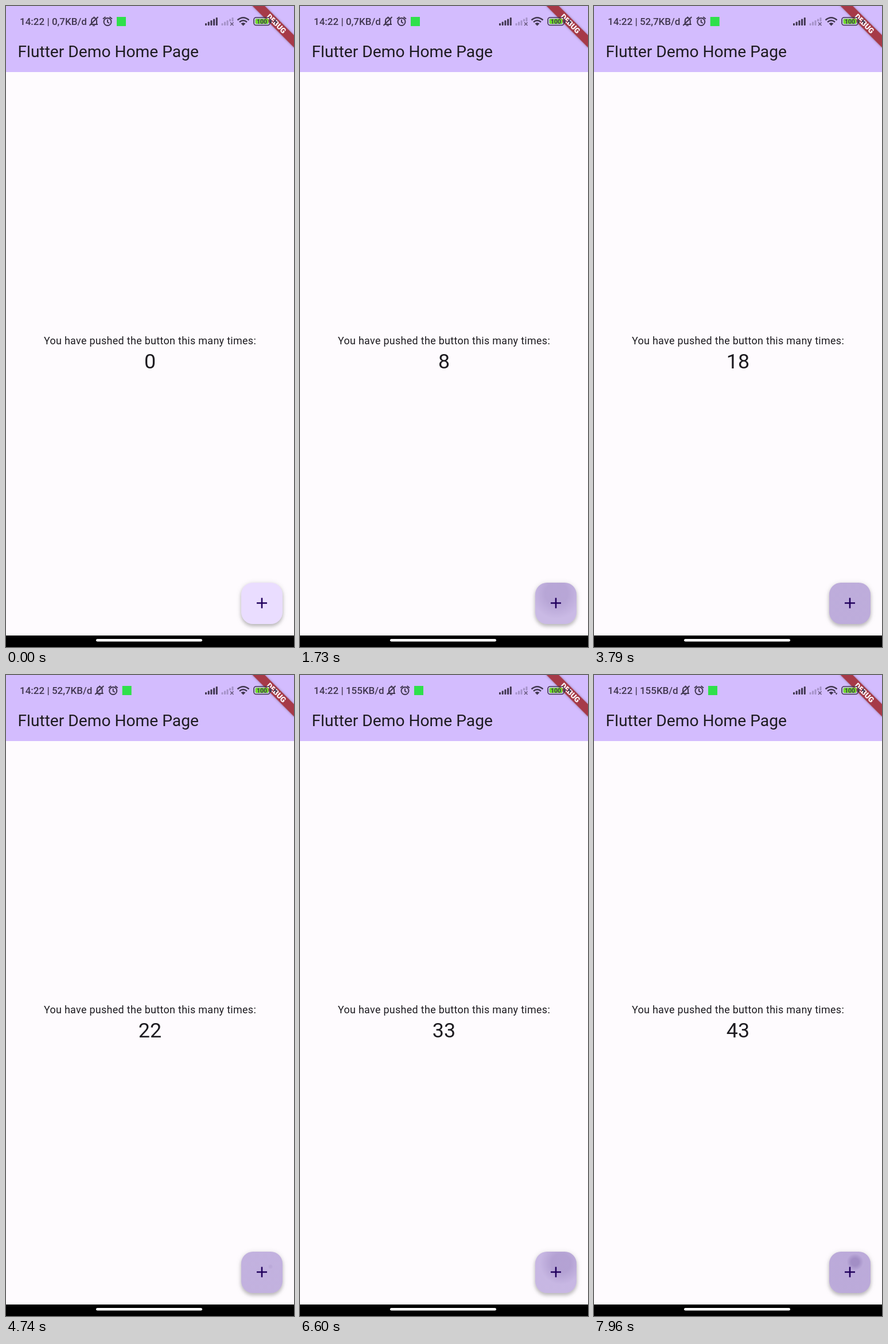
An HTML page for the animation above (8000 ms loop, 502 by 1116 pixels).

```html
<!DOCTYPE html>
<html lang="en">
<head>
<meta charset="utf-8">
<title>Counter demo</title>
<style>
  html, body { margin: 0; width: 100%; height: 100%; overflow: hidden; background: #fefbfe; }
  svg { display: block; width: 502px; height: 1116px; font-family: Roboto, sans-serif; fill: #1d1b20; }
  .line { fill: none; stroke: #40364f; stroke-width: 2; }
  .dark { fill: #40364f; }
  .ribbon { filter: drop-shadow(0 0 2px #0004); }
  .fab { filter: drop-shadow(0 4px 3px #0003) drop-shadow(0 1px 4px #0002); }
</style>
</head>
<body>
<svg viewBox="0 0 502 1116">
  <defs>
    <clipPath id="fabShape"><rect x="410" y="1004" width="72" height="72" rx="20.5"/></clipPath>
    <radialGradient id="ink">
      <stop offset=".45" stop-color="#21005d"/>
      <stop offset="1" stop-color="#21005d" stop-opacity="0"/>
    </radialGradient>
  </defs>
  <rect width="502" height="1116" fill="#fefbfe"/>
  <rect width="502" height="115" fill="#d3bcfe"/>
  <text x="20.5" y="88.5" font-size="28.16">Flutter Demo Home Page</text>

  <g transform="translate(502) rotate(45)">
    <rect class="ribbon" x="-52" y="35.84" width="104" height="15.36" fill="#a63a48"/>
    <text y="48" text-anchor="middle" font-size="13.06" font-weight="900" fill="#fff">DEBUG</text>
  </g>

  <!-- status bar -->
  <text id="status" class="dark" x="24" y="33" font-size="17" font-weight="500"></text>
  <g id="icons">
    <path class="line" d="M147 32h13M149 32v-6q0-5 4.5-5.5q4.5 .5 4.5 5.5v6M145.5 34l15-15"/>
    <path class="dark" d="M151 33.5h4v1.5h-4zM152.5 18.5h2v3h-2z"/>
    <circle class="line" cx="177" cy="27.5" r="6.5"/>
    <path class="line" d="M177 23.5v4.5l3 2M169 22.5l4.5-3.5M185 22.5l-4.5-3.5"/>
    <rect x="193" y="19" width="16" height="16" fill="#2fe04b"/>
  </g>
  <g id="bars" class="dark"></g>
  <path class="line" d="M391 28.5l5.5 5.5M396.500 28.5l-5.5 5.5" style="stroke-width:1.5" opacity=".75"/>
  <path class="line" style="stroke-width:2.4" d="M403.5 24.5q10-8.5 20 0M407 28q6.5-5.5 13 0"/>
  <path class="dark" d="M409.5 30.5q4-3 8 0l-4 4z"/>
  <path id="traffic" class="dark" d="M418 31l2-3 2 3zM420.5 31.5h4l-2 3z"/>
  <rect class="line" x="432" y="20" width="28" height="13.5" rx="4" style="stroke-width:1.6"/>
  <rect x="434.5" y="22.3" width="23" height="9" rx="2" fill="#70dc2c"/>
  <rect class="dark" x="461" y="24" width="2" height="5.5"/>
  <path class="dark" d="M471 21l-5 7h3.500l-1 5.500 5-7h-3.500z"/>
  <text class="dark" x="446" y="30.8" font-size="10.5" font-weight="700" text-anchor="middle">100</text>

  <!-- counter -->
  <text x="251" y="588.5" font-size="17.92" letter-spacing=".32" text-anchor="middle">You have pushed the button this many times:</text>
  <text id="count" x="251" y="630.5" font-size="35.84" text-anchor="middle"></text>

  <!-- action button -->
  <rect class="fab" x="410" y="1004" width="72" height="72" rx="20.5" fill="#eaddff"/>
  <g clip-path="url(#fabShape)">
    <rect id="press" x="410" y="1004" width="72" height="72" fill="#21005d"/>
    <g id="splashes" fill="url(#ink)"></g>
  </g>
  <path d="M437 1039.5h18M446 1030.5v18" stroke="#21005d" stroke-width="2.6"/>

  <rect y="1096" width="502" height="20" fill="#000"/>
  <rect x="157" y="1102" width="185" height="4.5" rx="2.25" fill="#fff"/>
</svg>
<script>
const LOOP = 8000, UP_DELAY = 90, POOL = 5;
const $ = id => document.getElementById(id);
const clamp = v => Math.max(0, Math.min(1, v));

function add(parent, tag, attrs = {}) {
  const el = document.createElementNS("http://www.w3.org/2000/svg", tag);
  set(el, attrs);
  return $(parent).appendChild(el);
}
function set(el, attrs) {
  for (const k in attrs) el.setAttribute(k, attrs[k]);
}

// Signal bars: a full set and a faint one without service
for (let i = 0; i < 5; i++) {
  const h = 4 + i * 2.5;
  add("bars", "rect", { x: 347 + i * 4.7, y: 34 - h, width: 3, height: h, rx: 1 });
  add("bars", "rect", { x: 375.5 + i * 4.5, y: 34 - h, width: 3, height: i > 2 ? h - 7 : h, rx: 1, opacity: .3 });
}

// Finger rhythm: [tap number, time down, x, y]
const rhythm = [
  [1, 250, 450, 1026], [8, 1610, 447, 1023], [15, 2900, 467, 1024], [23, 4730, 461, 1030],
  [26, 5310, 456, 1026], [33, 6490, 455, 1024], [44, 7900, 455, 1022]
];
const taps = [];
rhythm.slice(1).forEach((b, i) => {
  const a = rhythm[i];
  for (let n = a[0]; n < b[0]; n++) {
    const [, time, x, y] = a.map((v, j) => v + (b[j] - v) * (n - a[0]) / (b[0] - a[0]));
    taps.push({ time, x, y });
  }
});
const [, time, x, y] = rhythm.at(-1);
taps.push({ time, x, y });

const pool = Array.from({ length: POOL }, () => add("splashes", "circle"));

// Ink appears small and dense, spreads ever faster, then fades
function splash({ x, y }, age) {
  const density = .1 + .12 * (1 - clamp(age / 130));
  const fade = clamp(age / 50) * (1 - clamp((age - 170) / 130));
  return { cx: x, cy: y, r: 3 + age * .14 + (age / 42) ** 3, opacity: density * fade };
}

function draw(t) {
  $("count").textContent = taps.filter(p => p.time + UP_DELAY <= t).length;

  const [rate, shift] = t < 2300 ? ["0,7", 0] : t < 6100 ? ["52,7", 9.7] : ["155", 6];
  $("status").textContent = `14:22 | ${rate}KB/d`;
  set($("icons"), { transform: `translate(${shift})` });
  set($("traffic"), { opacity: t > 7500 ? 1 : 0 });

  set($("press"), { opacity: .16 * clamp((t - taps[0].time) / 200) });
  const recent = taps.filter(p => p.time <= t).slice(-POOL);
  pool.forEach((el, i) => {
    const tap = recent[i];
    set(el, tap ? splash(tap, t - tap.time) : { r: 0 });
  });
}

const start = performance.now();
function tick() {
  draw((performance.now() - start) % LOOP);
  requestAnimationFrame(tick);
}
tick();
</script>
</body>
</html>
```
